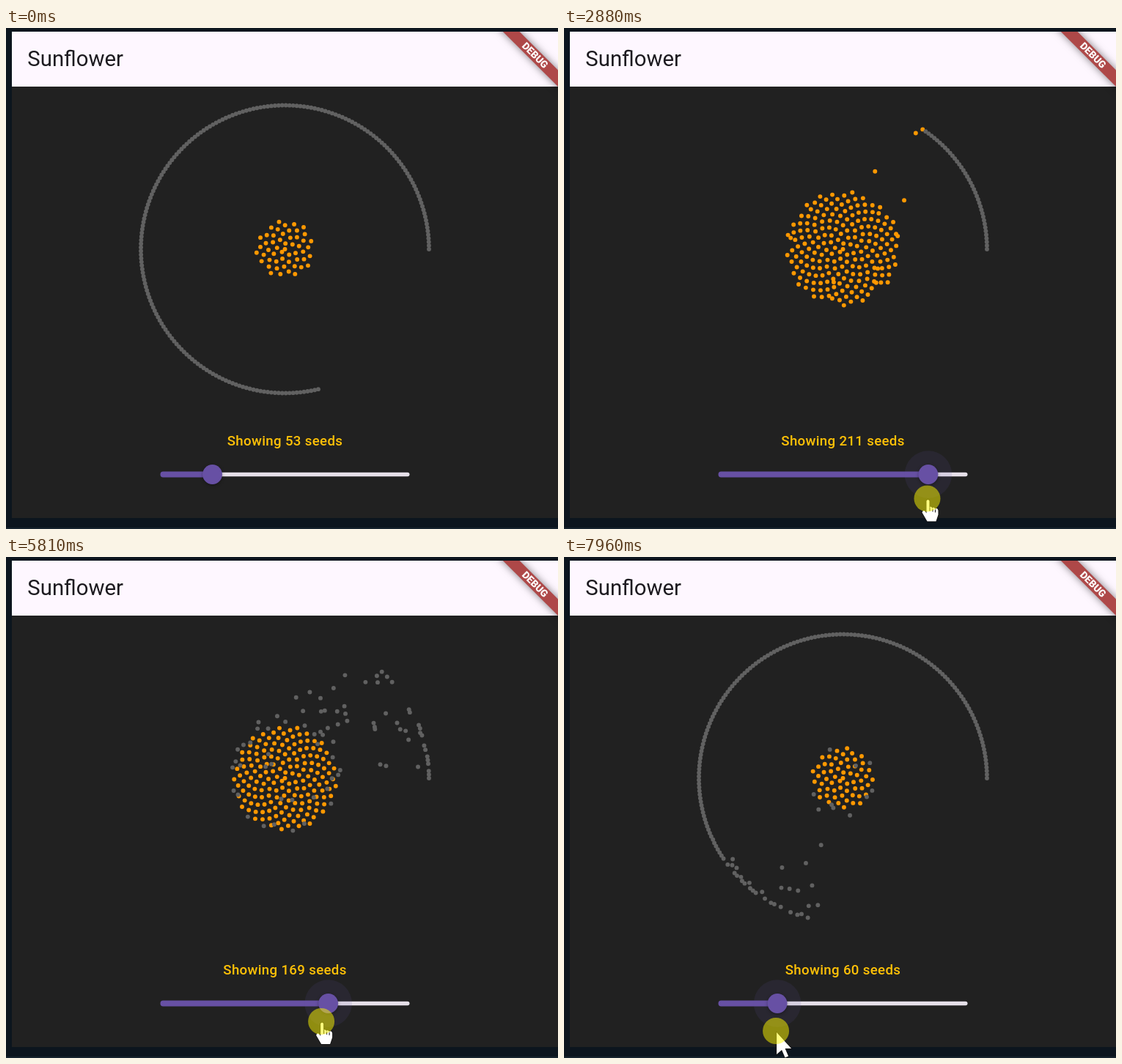
An HTML page with a canvas for the animation above (8000 ms loop, 753 px wide and 684 px high).

```html
<!DOCTYPE html>
<html lang="en">
<head>
<meta charset="utf-8">
<title>Sunflower</title>
<style>
  html, body { margin: 0; width: 753px; height: 684px; overflow: hidden; background: #0c151e; }
  body { position: relative; font-family: Roboto, sans-serif; }
  canvas { position: absolute; left: 0; top: 0; display: block; }
  div { position: absolute; white-space: nowrap; }
  #title { left: 29.3px; top: 4px; font-size: 29.33px; line-height: 76px; color: #1d1b20; }
  #label { left: 8px; width: 745px; top: 550px; line-height: 29px; text-align: center;
    font-size: 18.67px; font-weight: 500; letter-spacing: .33px; color: #ffc107; }
  #debug { left: 681.5px; top: 29.3px; width: 80px; line-height: 16px; text-align: center;
    font-size: 13.6px; font-weight: 900; color: #fff; transform: rotate(45deg); }
</style>
</head>
<body>
<canvas id="stage" width="753" height="684"></canvas>
<div id="title">Sunflower</div>
<div id="label"></div>
<div id="debug">DEBUG</div>
<script>
const LOOP = 8000, MAX = 250, TAU = Math.PI * 2, PHI = (Math.sqrt(5) + 1) / 2;
const CX = 380.5, CY = 302, HALF = 218.3, SLIDER_Y = 609.5;
const PRESS = 1420, LEAD = 70;
const ctx = document.getElementById('stage').getContext('2d');
const label = document.getElementById('label');

// The picture updates in bursts of about 14 per second
const bursts = [[400, 1020], [1420, 2180], [2250, 3020], [3090, 3850], [3920, 4700],
  [4900, 5670], [5740, 6500], [6570, 7340], [7400, 7960]];
const ticks = [0];
for (const [a, b] of bursts) {
  const steps = Math.round((b - a) / 69.5);
  for (let i = 0; i <= steps; i++) ticks.push(a + (b - a) * i / steps);
}

// Drags of the slider: end time, value, power of the easing
const drags = [
  [1350, 53], [2180, 179, 3.4], [3020, 212, .2], [3850, 248, 2], [3920, 250], [5150, 250],
  [5810, 169, 1.3], [6500, 147, .6], [7270, 102, 1.5], [7540, 72], [7960, 60, 2]
];
const heights = [[1350, 624], [2180, 642], [3850, 643], [4700, 630], [5810, 634], [7270, 649], [7960, 647]];

const progress = (t, a, b) => Math.min(1, Math.max(0, (t - a) / (b - a)));

function follow(keys, t) {
  let [time, value] = keys[0];
  for (const [end, next, power = 1] of keys.slice(1)) {
    if (t <= time) break;
    const from = value;
    value += (next - from) * progress(t, time, end) ** power;
    time = end;
  }
  return value;
}
const valueAt = t => follow(drags, t);
const seedsAt = t => Math.round(valueAt(t));
const thumbX = value => 209.3 + 1.363 * value;

// cubic-bezier(.42, 0, .58, 1)
function easeInOut(p) {
  if (p <= 0) return 0;
  if (p >= 1) return 1;
  let lo = 0, hi = 1;
  for (let i = 0; i < 20; i++) {
    const s = (lo + hi) / 2, r = 1 - s;
    if (3 * r * r * s * .42 + 3 * r * s * s * .58 + s * s * s < p) lo = s; else hi = s;
  }
  return lo * lo * (3 - 2 * lo);
}

let state = 20;
function random() {
  state = state + 0x6D2B79F5 | 0;
  let x = Math.imul(state ^ state >>> 15, 1 | state);
  x = x + Math.imul(x ^ x >>> 7, 61 | x) ^ x;
  return ((x ^ x >>> 14) >>> 0) / 4294967296;
}

// Each dot flies between its place on the ring and its place in the flower
const dots = Array.from({ length: MAX }, (_, i) => {
  const theta = i * TAU / PHI, r = Math.sqrt(i) / 40 * HALF;
  const a = TAU * i / (MAX - 1);
  const up = i < 53 ? -LOOP : ticks.find(t => seedsAt(t) > i);
  const down = ticks.find(t => t > up && seedsAt(t) <= i) ?? Infinity;
  return {
    seed: [CX + r * Math.cos(theta), CY - r * Math.sin(theta)],
    ring: [CX + HALF * .9 * Math.cos(a), CY + HALF * .9 * Math.sin(a)],
    up, down,
    upTime: 250 + 500 * random(),
    downTime: 250 + 500 * random()
  };
});

function disc(x, y, r, color) {
  ctx.fillStyle = color;
  ctx.beginPath();
  ctx.arc(x, y, r, 0, TAU);
  ctx.fill();
}
function rect(x, y, w, h, color) {
  ctx.fillStyle = color;
  ctx.fillRect(x, y, w, h);
}
function bar(x0, x1, h, color) {
  ctx.fillStyle = color;
  ctx.beginPath();
  ctx.roundRect(x0, SLIDER_Y - h / 2, x1 - x0, h, h / 2);
  ctx.fill();
}

function drawFrame() {
  rect(0, 0, 753, 684, '#0c151e');
  rect(0, 682, 753, 2, '#17242e');
  rect(8, 5, 745, 664, '#212121');
  rect(8, 5, 745, 75, '#fef7ff');
  ctx.save();
  ctx.beginPath();
  ctx.rect(8, 5, 745, 664);
  ctx.clip();
  ctx.translate(721.5, 37.3);
  ctx.rotate(Math.PI / 4);
  ctx.shadowColor = 'rgba(0,0,0,.5)';
  ctx.shadowBlur = 11;
  rect(-80, -8, 160, 16, '#ae4848');
  ctx.restore();
}

function drawDots(t) {
  for (const d of dots) {
    const leaving = t >= d.down;
    const k = leaving ? 1 - easeInOut((t - d.down) / d.downTime)
      : easeInOut((t - d.up) / d.upTime);
    const [x, y] = d.ring.map((v, i) => v + (d.seed[i] - v) * k);
    disc(x, y, 2.95, t >= d.up && !leaving ? '#ff9800' : '#616161');
  }
}

function drawSlider(t, n) {
  const x = thumbX(n);
  bar(x - 4, 550.5, 5.33, '#e6e0e9');
  bar(210.5, x, 8, '#6750a4');
  if (t >= PRESS) disc(x, SLIDER_Y, 32.3, 'rgba(103,80,164,.12)');
  ctx.save();
  ctx.shadowColor = 'rgba(0,0,0,.35)';
  ctx.shadowBlur = 4;
  ctx.shadowOffsetY = 1.5;
  disc(x, SLIDER_Y, 13.4, '#6750a4');
  ctx.restore();
}

// The pointer runs slightly ahead of the thumb, after entering from the lower right
function pointerAt(t) {
  const p = progress(t, 400, 1020);
  const entry = 252 * (1 - p) * (1 - 1.4 * p);
  const detour = 126 * (easeInOut(progress(t, 3850, 4650)) - easeInOut(progress(t, 4870, 5180)));
  return [
    thumbX(valueAt(t + LEAD)) - 2 + entry + detour,
    follow(heights, t) + 48 * (1 - p) ** 2
  ];
}

const arrow = new Path2D('M1 2V32L8 26L12.5 36.5L17 34.5L12.5 24H21Z');
const hand = new Path2D('M-1 3Q1 0 3 3V12Q5 10 7 13Q9 11 11 14Q14 12 15 16V22L12 31H0L-7 19Q-6 15-3 17L-1 20Z');
const knuckles = new Path2D('M3.5 12V17M7.5 14V18M11 15V19');

function drawPointer(t) {
  if (t < 400) return;
  const [x, y] = pointerAt(t);
  const overSlider = y < 642.5 && x < 560;
  const shape = overSlider ? hand : arrow;
  ctx.save();
  ctx.translate(x, y);
  ctx.lineWidth = 1.5;
  ctx.strokeStyle = '#111';
  ctx.stroke(shape);
  ctx.fillStyle = '#fff';
  ctx.fill(shape);
  ctx.lineWidth = 1;
  if (overSlider) ctx.stroke(knuckles);
  disc(0, 0, 18, 'rgba(255,250,0,.5)');
  ctx.restore();
}

const origin = performance.now();
function render() {
  const now = (performance.now() - origin) % LOOP;
  const t = ticks.filter(v => v <= now + 1).pop();
  const n = seedsAt(t);
  drawFrame();
  drawDots(t);
  drawSlider(t, n);
  drawPointer(t);
  const text = `Showing ${n} seeds`;
  if (label.textContent !== text) label.textContent = text;
  requestAnimationFrame(render);
}
render();
</script>
</body>
</html>
```
